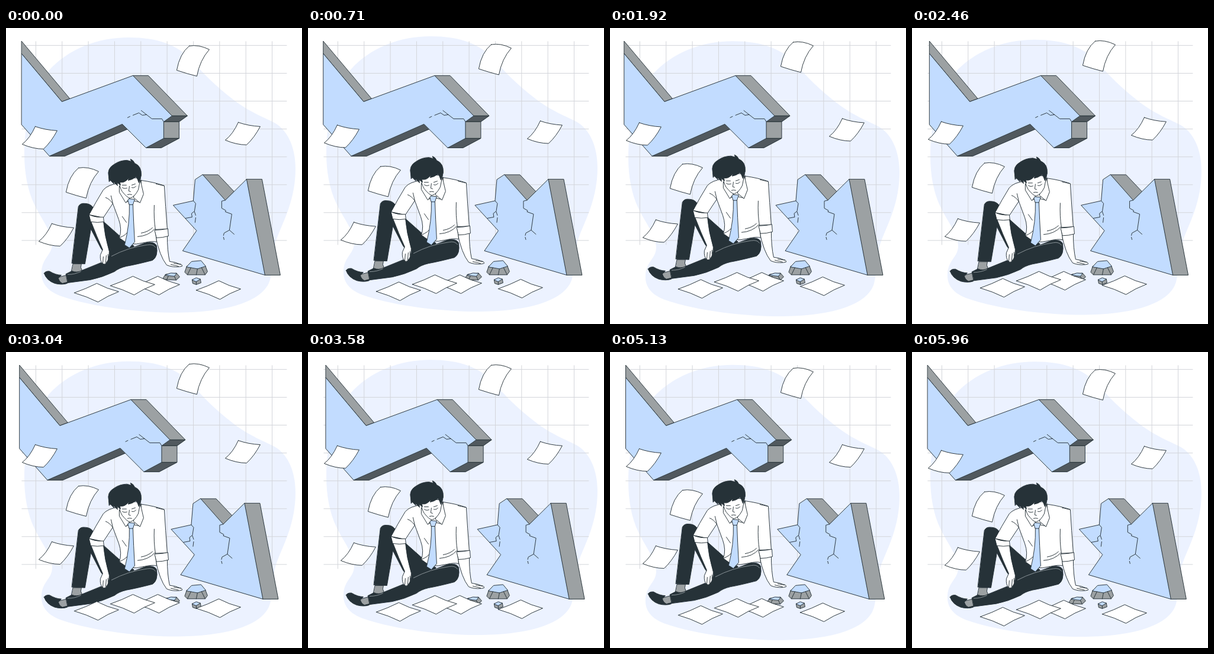
Animation, 500 px wide and 500 px high, one loop 6000 ms. Source, as an HTML page:

```html
<!DOCTYPE html>
<html lang="en">
<head>
<meta charset="utf-8">
<title>Broken arrow</title>
<style>
  html, body { margin: 0; width: 100%; height: 100%; overflow: hidden; background: #fff; }
  svg { display: block; width: 100vw; height: 100vh; }
  path { stroke: #263238; stroke-width: .95; stroke-linejoin: round; stroke-linecap: round; }
  .white { fill: #fff; }
  .blue { fill: #c2dcff; }
  .gray { fill: #9ca1a3; }
  .slate { fill: #51595e; }
  .ink { fill: #263238; }
  .line { fill: none; }
  .seam { fill: none; stroke: #8f989c; }
  .blob { fill: #ecf2ff; stroke: none; }
  .grid { fill: none; stroke: #d3d5da; stroke-width: 1; stroke-linecap: butt; }
</style>
</head>
<body>
<svg viewBox="0 0 500 500">
  <defs>
    <path id="tall" class="white" d="M309 30Q325 27 343 36Q327 54 322 81Q306 77 288 71Q293 43 309 30Z"/>
    <path id="wide" class="white" d="M392 159Q409 165 429 166Q419 185 406 197Q389 197 370 189Q383 179 392 159Z"/>
    <path id="flat" class="white" d="M0 0Q20 -7 38 -16Q55 -7 75 -2Q56 5 40 15.500Q21 6 0 0Z"/>
  </defs>

  <path id="blob" class="blob" d="M72 79C105 42 155 22.700 207 22.700C258 22.700 290 36 312 60S353 104 383 127S437 158 452 166C475 178 489 207 489 244C489 295 470 330 459 358S452 410 446 432C435 470 370 487.500 285 487.500C235 487.500 150 480 91 459C66 449 59 434 60 418C61 395 78 390 78 371C78 352 60 330 48 305S31 250 31 220C31 170 42 113 72 79Z"/>

  <g transform="translate(.4 .4)">
    <path id="grid" class="grid"/>

    <g id="arrow">
      <path class="gray" d="M26 22L107.500 119L94 124L26 43Z"/>
      <path class="slate" d="M73 216H99L206 170L196 162Z"/>
      <path class="gray" d="M214 80H240L306 148H280Z"/>
      <path class="slate" d="M280 148H306L292 158H266Z"/>
      <path class="gray" d="M266 158H292V186H266Z"/>
      <path class="slate" d="M266 186H292L262 202H236Z"/>
      <path class="blue" d="M26 43L94 124L214 80L280 148L266 158V186L236 202L196 162L73 216L26 163Z"/>
      <path class="line" d="M205 151L209 149M214 147L224 143L230 147L237 146M228 139L246 153H263L266 158"/>

      <path class="gray" d="M332 247.500H358L385 276L370 291Z"/>
      <path class="gray" d="M406 255H432L463 417H437Z"/>
      <path class="blue" d="M332 247.500L370 290.500L406 255L437 417L298 376L321.500 342L282 299L316 291.500L319 256Z"/>
      <path class="line" d="M316 291.500L320 296L318 309L313 313L314 319L303 321M318 310L320 316M320 320L319 328"/>
      <path class="line" d="M370 290.500L364 292V304L371 308L370 310L381 314L377 341L385 348M377 341L368 346L367 350M367 353L368 357"/>
    </g>

    <g id="rocks">
      <path class="gray" d="M305 402L301.500 412L306 416.500H336L340 411L336.500 402Z"/>
      <path class="blue" d="M304.500 403L313 394L329 392.500L337 402L323 406.500L312 404.500Z"/>
      <path class="line" d="M312 404.500L306 416.500M323 406.500L321 416.500M330 404.500L336 416.500"/>
      <path class="gray" d="M269 416L265 422L267 424.500L287 425.500L293 420L288 414Z"/>
      <path class="blue" d="M268 417L278 413.500L288 414L284 419L274 418Z"/>
      <path class="line" d="M274 418L271 425M284 419L287 425.500"/>
      <path class="gray" d="M314 425L315 431L321 433L329 430L328 424Z"/>
      <path class="blue" d="M314 425L321 421.500L328 424L321 428Z"/>
      <path class="line" d="M321 428V433"/>
    </g>

    <g id="man">
      <path class="ink" d="M122 301Q125 295 133 296Q142 296 147 303L166 328L193 352L216 368L200 384L172 388L160 372L143 339L133 398L111 397Z"/>
      <path class="gray" d="M113 398H127L126 404L129 412H110Z"/>
      <path class="gray" d="M87 421L102 417L106 429L93 432Z"/>
      <path class="ink" d="M64 414Q66 410 73 410.500Q84 417 93 417Q91 420 88 422Q89 428 95 431L103 429V431Q94 434 82 431Q68 426 64 414Z"/>
      <path class="ink" d="M101 415L111 410Q119 414 128 409L160 396Q172 387 194 378L236 362Q250 360 254 367Q257 386 247 392Q220 399 203 402Q190 405 183 411Q162 421 142 425L104 430Z"/>
      <path class="seam" d="M178 385Q206 370 238 366Q248 364 252 370M104 416Q116 416 126 411"/>

      <path class="white" d="M252 350Q259 385 271 400Q280 404 292 403L297 402Q298 399 292 398Q286 395 276 394Q272 376 272 350Z"/>
      <path class="line" d="M278 399L291 402M283 397L295 399"/>
      <path class="white" d="M190 262Q172 264 164 273Q151 294 140 315L164 320L180 296L190 323Q196 340 191 354L205 364Q220 366 234 362Q247 359 254 361L252 340L272 339Q269 300 267 266Q250 260 228 257Z"/>
      <path class="white" d="M251 341Q262 341 273 338.500L274 351Q264 354 254 354Z"/>
      <path class="line" d="M250 299Q249 322 252 340M222 352Q240 351 251 339M228 346Q240 344 247 337M180 296L177 283M180 296Q174 288 168 286M191 354Q202 350 207 342M196 318L203 328M253 263L266 266"/>
      <path class="white" d="M143 326Q153 352 163 374L159 383Q158 393 163 398Q167 400 169 396Q174 391 174 377Q166 350 164 325Z"/>
      <path class="line" d="M163 398L164 386M168 396L169 384M172 389V382"/>
      <path class="white" d="M140 315Q151 320 164 319L165 327Q154 329 143 327Z"/>

      <path class="white" d="M192 266L203 294L209 290L226 294L228 257Z"/>
      <path class="blue" d="M208 297H214Q215 326 217 361L208 371L200 366Q209 330 208 297Z"/>
      <path class="blue" d="M205 288L217 289L214 298H208Z"/>
      <path class="white" d="M191 267V277L202 295L208 287Z"/>
      <path class="white" d="M227 258Q230 272 232 280L226 295L215 286Z"/>
      <path class="white" d="M190 254Q191 269 196 276Q204 286 209 287Q217 285 223 273L227 253Z"/>
      <path class="ink" d="M173 250Q170 237 182 230Q192 223 204 223L211 225L210 221Q215 223 217 228Q229 233 228 249L224 261Q222 254 219 251Q213 256 206 257L207 253Q200 262 192 260L193 265L187 260L188 266L181 259L182 263L176 257L174 259Z"/>
      <path class="line" d="M196 269Q199 272 204 270M212 269Q215 271 219 267M196 265L203 265M212 265L218 263M208 267L207 275L210 276M205 281Q208 280 212 281"/>
    </g>

    <g id="papers">
      <use href="#tall"/>
      <use href="#tall" x="-187" y="206"/>
      <use href="#wide"/>
      <use href="#wide" x="-343" y="7"/>
      <use href="#wide" x="-315" y="171"/>
      <use href="#flat" x="115" y="447"/>
      <use href="#flat" x="218" y="435"/>
      <use href="#flat" x="176" y="435"/>
      <use href="#flat" x="321" y="442.500"/>
    </g>
  </g>
</svg>
<script>
const LOOP = 6000;
const byId = id => document.getElementById(id);
const [blob, arrow, man, papers] = ['blob', 'arrow', 'man', 'papers'].map(byId);

const lines = (count, draw) => Array.from({ length: count }, (_, i) => draw(i)).join('');
byId('grid').setAttribute('d',
  lines(8, i => `M26 ${29 + 47.070 * i}H474`) +
  lines(10, i => `M${50 + 44.350 * i} 22V366`));

// Rise by 10 and return, linearly, once per period.
function float(time, period) {
  const phase = time % period / period;
  return -10 * (1 - Math.abs(1 - 2 * phase));
}

// Alternating swings that double up to 4, then die away in mirror order.
function swing(step) {
  const k = Math.min(step, 10 - step);
  return k && (-1) ** k * Math.min(4, 2 ** (k - 1));
}

function shake(time) {
  const position = time / LOOP * 10;
  const step = Math.floor(position);
  return swing(step) + (swing(step + 1) - swing(step)) * (position - step);
}

const move = (node, x, y) => node.setAttribute('transform', `translate(${x} ${y})`);

function render(time) {
  move(arrow, shake(time), 0);
  move(man, 0, float(time, 3000));
  move(blob, 0, float(time + 1000, 3000));
  move(papers, 0, float(time, 6000));
}

const start = performance.now();
function tick() {
  render((performance.now() - start) % LOOP);
  requestAnimationFrame(tick);
}
tick();
</script>
</body>
</html>
```
